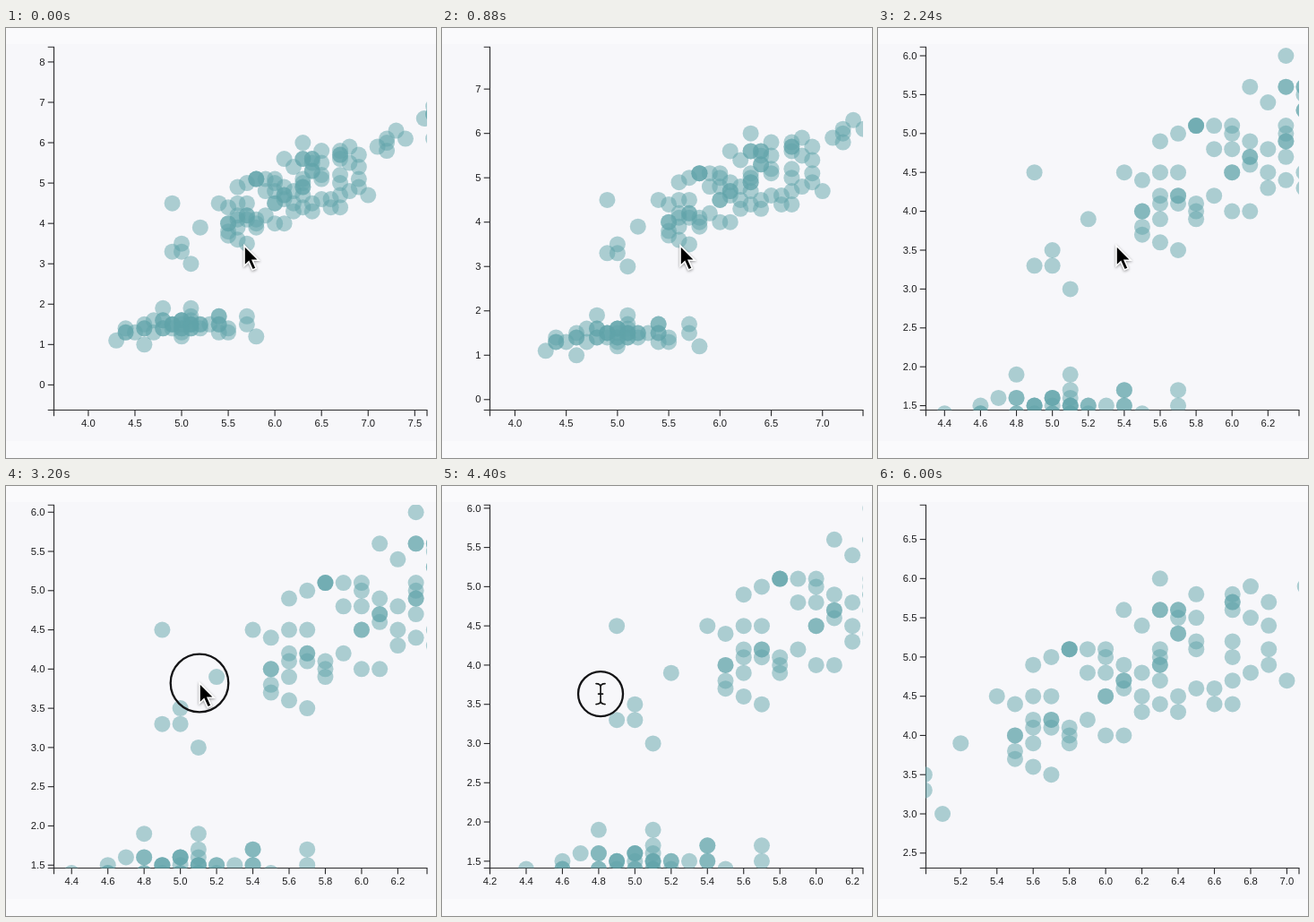
Animation of 480 by 480 pixels, one loop 6080 ms. Source, as an HTML page:

```html
<!DOCTYPE html>
<html lang="en">
<head>
<meta charset="utf-8">
<title>Zoomable scatter plot</title>
<style>
  html, body { margin: 0; width: 100%; height: 100%; overflow: hidden; background: #fafafc; }
  svg { display: block; width: 480px; height: 480px; }
  text { font: 11.26px "Liberation Sans", Arial, sans-serif; fill: #1c1c1e; }
  .axis path, .axis line { fill: none; stroke: #2b2b2d; stroke-width: 1.13; }
  #dots circle { fill: #61a3a9; opacity: .5; }
  #ring { fill: none; stroke: #141416; stroke-width: 2.3; }
  #arrow { stroke: #fff; stroke-width: 1.6; filter: drop-shadow(0 1.5px 1.5px #0006); }
  #beam path { fill: none; stroke-linecap: round; }
</style>
</head>
<body>
<svg viewBox="0 0 480 480">
  <clipPath id="plot"><rect x="53" y="21" width="417" height="405.5"/></clipPath>
  <rect y="18" width="480" height="443" fill="#f7f7fa"/>
  <g class="axis">
    <path d="M46.7 21.3H53.5V426.5H46.7M53.5 433.2V426.5H470V433.2"/>
    <g id="ticks"></g>
  </g>
  <g id="dots" clip-path="url(#plot)"></g>
  <circle id="ring"/>
  <g id="pointer">
    <path id="arrow" d="M0 0V22.5L5 17.8L9.2 27L13.2 25.2L9.2 16.2H16.2Z"/>
    <g id="beam">
      <path id="stem" d="M-5 -11.5Q0 -11.5 0 -7.5Q0 -11.5 5 -11.5M0 -8V8M-5 11.5Q0 11.5 0 7.5Q0 11.5 5 11.5M-2.5 0H2.5" stroke="#fff" stroke-width="3.4"/>
      <use href="#stem" style="stroke:#141416"/>
      <path d="M-5 -11.5Q0 -11.5 0 -7.5Q0 -11.5 5 -11.5M0 -8V8M-5 11.5Q0 11.5 0 7.5Q0 11.5 5 11.5M-2.5 0H2.5" stroke="#141416" stroke-width="1.7"/>
    </g>
  </g>
</svg>
<script>
const LOOP = 6080, STEP = 80;
const LEFT = 53.5, RIGHT = 470, TOP = 21.3, BOTTOM = 426.5;
const UNIT_X = 104.12, UNIT_Y = 45.06;

// Iris: sepal length, petal length
const setosa = [
  5.1,1.4, 4.9,1.4, 4.7,1.3, 4.6,1.5, 5,1.4, 5.4,1.7, 4.6,1.4, 5,1.5, 4.4,1.4, 4.9,1.5,
  5.4,1.5, 4.8,1.6, 4.8,1.4, 4.3,1.1, 5.8,1.2, 5.7,1.5, 5.4,1.3, 5.1,1.4, 5.7,1.7, 5.1,1.5,
  5.4,1.7, 5.1,1.5, 4.6,1, 5.1,1.7, 4.8,1.9, 5,1.6, 5,1.6, 5.2,1.5, 5.2,1.4, 4.7,1.6,
  4.8,1.6, 5.4,1.5, 5.2,1.5, 5.5,1.4, 4.9,1.5, 5,1.2, 5.5,1.3, 4.9,1.5, 4.4,1.3, 5.1,1.5,
  5,1.3, 4.5,1.3, 4.4,1.3, 5,1.6, 5.1,1.9, 4.8,1.4, 5.1,1.6, 4.6,1.4, 5.3,1.5, 5,1.4
];
const versicolor = [
  7,4.7, 6.4,4.5, 6.9,4.9, 5.5,4, 6.5,4.6, 5.7,4.5, 6.3,4.7, 4.9,3.3, 6.6,4.6, 5.2,3.9,
  5,3.5, 5.9,4.2, 6,4, 6.1,4.7, 5.6,3.6, 6.7,4.4, 5.6,4.5, 5.8,4.1, 6.2,4.5, 5.6,3.9,
  5.9,4.8, 6.1,4, 6.3,4.9, 6.1,4.7, 6.4,4.3, 6.6,4.4, 6.8,4.8, 6.7,5, 6,4.5, 5.7,3.5,
  5.5,3.8, 5.5,3.7, 5.8,3.9, 6,5.1, 5.4,4.5, 6,4.5, 6.7,4.7, 6.3,4.4, 5.6,4.1, 5.5,4,
  5.5,4.4, 6.1,4.6, 5.8,4, 5,3.3, 5.6,4.2, 5.7,4.2, 5.7,4.2, 6.2,4.3, 5.1,3, 5.7,4.1
];
const virginica = [
  6.3,6, 5.8,5.1, 7.1,5.9, 6.3,5.6, 6.5,5.8, 7.6,6.6, 4.9,4.5, 7.3,6.3, 6.7,5.8, 7.2,6.1,
  6.5,5.1, 6.4,5.3, 6.8,5.5, 5.7,5, 5.8,5.1, 6.4,5.3, 6.5,5.5, 7.7,6.7, 7.7,6.9, 6,5,
  6.9,5.7, 5.6,4.9, 7.7,6.7, 6.3,4.9, 6.7,5.7, 7.2,6, 6.2,4.8, 6.1,4.9, 6.4,5.6, 7.2,5.8,
  7.4,6.1, 7.9,6.4, 6.4,5.6, 6.3,5.1, 6.1,5.6, 7.7,6.1, 6.3,5.6, 6.4,5.5, 6,4.8, 6.9,5.4,
  6.7,5.6, 6.9,5.1, 5.8,5.1, 6.8,5.9, 6.7,5.7, 6.7,5.2, 6.3,5, 6.5,5.2, 6.2,5.4, 5.9,5.1
];

// Smooth curve through [time, value] keys that never overshoots them
function curve(keys) {
  const slope = i => (keys[i + 1][1] - keys[i][1]) / (keys[i + 1][0] - keys[i][0]);
  const tangent = i => {
    if (i === 0 || i === keys.length - 1) return 0;
    const a = slope(i - 1), b = slope(i);
    return a * b > 0 ? 2 * a * b / (a + b) : 0;
  };
  return t => {
    const last = keys.length - 1;
    if (t <= keys[0][0]) return keys[0][1];
    if (t >= keys[last][0]) return keys[last][1];
    const i = keys.findIndex(k => k[0] > t) - 1;
    const [t0, v0] = keys[i], [t1, v1] = keys[i + 1];
    const h = t1 - t0, u = (t - t0) / h, w = 1 - u;
    return v0 * (1 + 2 * u) * w * w + v1 * u * u * (3 - 2 * u)
      + h * u * w * (tangent(i) * w - tangent(i + 1) * u);
  };
}

const zoom = curve([[160, 1], [880, 1.099], [1440, 1.5545], [2400, 1.943]]);
const dragX = curve([[3280, 0], [3520, 45], [3760, 115], [4000, 148.4], [4080, 153],
  [4320, 70], [4560, -85], [4720, -129.6], [4800, -133], [5200, -142.8]]);
const dragY = curve([[3280, 0], [3520, 22], [3760, 75], [4000, 47.2], [4080, 20],
  [4320, -12], [4560, 28], [4720, 51.7], [4800, 62], [5200, 74.1]]);
const approach = curve([[2640, 1], [3120, 0]]);
const ringSize = curve([[3120, 39], [3200, 32.3], [3280, 25], [5200, 25], [5440, 34]]);
const ringAlpha = curve([[3040, 0], [3200, 1], [5200, 1], [5440, 0]]);

const $ = id => document.getElementById(id);
function add(parent, tag, attrs) {
  const el = document.createElementNS("http://www.w3.org/2000/svg", tag);
  for (const name in attrs) el.setAttribute(name, attrs[name]);
  parent.append(el);
  return el;
}

const points = [setosa, versicolor, virginica].flatMap(list => {
  const out = [];
  for (let i = 0; i < list.length; i += 2) {
    out.push({ x: list[i], y: list[i + 1], el: add($("dots"), "circle", { r: 9 }) });
  }
  return out;
});

function tickValues(lo, hi) {
  const raw = (hi - lo) / 10, base = 10 ** Math.floor(Math.log10(raw)), ratio = raw / base;
  const step = base * (ratio >= 50 ** .5 ? 10 : ratio >= 10 ** .5 ? 5 : ratio >= 2 ** .5 ? 2 : 1);
  const out = [];
  for (let i = Math.ceil(lo / step); i * step <= hi; i++) {
    out.push([i * step, (i * step).toFixed(step < .99 ? 1 : 0)]);
  }
  return out;
}

function drawTicks(x, y) {
  const box = $("ticks");
  box.replaceChildren();
  for (const [v, label] of tickValues(x.invert(LEFT), x.invert(RIGHT))) {
    const p = x(v);
    add(box, "line", { x1: p, x2: p, y1: BOTTOM, y2: BOTTOM + 6.75 });
    add(box, "text", { x: p, y: BOTTOM + 18.1, "text-anchor": "middle" }).textContent = label;
  }
  for (const [v, label] of tickValues(y.invert(BOTTOM), y.invert(TOP))) {
    const p = y(v);
    add(box, "line", { x1: LEFT - 6.75, x2: LEFT, y1: p, y2: p });
    add(box, "text", { x: LEFT - 10.1, y: p + 3.7, "text-anchor": "end" }).textContent = label;
  }
}

function scale(value, pos, unit) {
  const f = v => pos + (v - value) * unit;
  f.invert = p => value + (p - pos) / unit;
  return f;
}

function draw(t) {
  const k = zoom(t);
  const x = scale(5.0142, 197.5 + dragX(t), k * UNIT_X);
  const y = scale(3.675, 232.8 + dragY(t), -k * UNIT_Y);
  drawTicks(x, y);
  for (const p of points) {
    p.el.setAttribute("cx", x(p.x));
    p.el.setAttribute("cy", y(p.y));
  }

  // The chart trails the pointer slightly
  const px = 216 + 50 * approach(t) + dragX(t + 80);
  const py = 220 + 23 * approach(t) + dragY(t + 80);
  const pressed = t >= 3360;
  $("pointer").setAttribute("transform", `translate(${px} ${py})`);
  $("pointer").style.display = t < 5440 ? "" : "none";
  $("arrow").style.display = pressed ? "none" : "";
  $("beam").style.display = pressed ? "" : "none";
  $("ring").setAttribute("cx", px);
  $("ring").setAttribute("cy", py);
  $("ring").setAttribute("r", ringSize(t));
  $("ring").style.opacity = ringAlpha(t);
}

const start = performance.now();
let shown = -1;
function tick() {
  const t = Math.floor((performance.now() - start) % LOOP / STEP) * STEP;
  if (t !== shown) draw(shown = t);
  requestAnimationFrame(tick);
}
tick();
</script>
</body>
</html>
```
